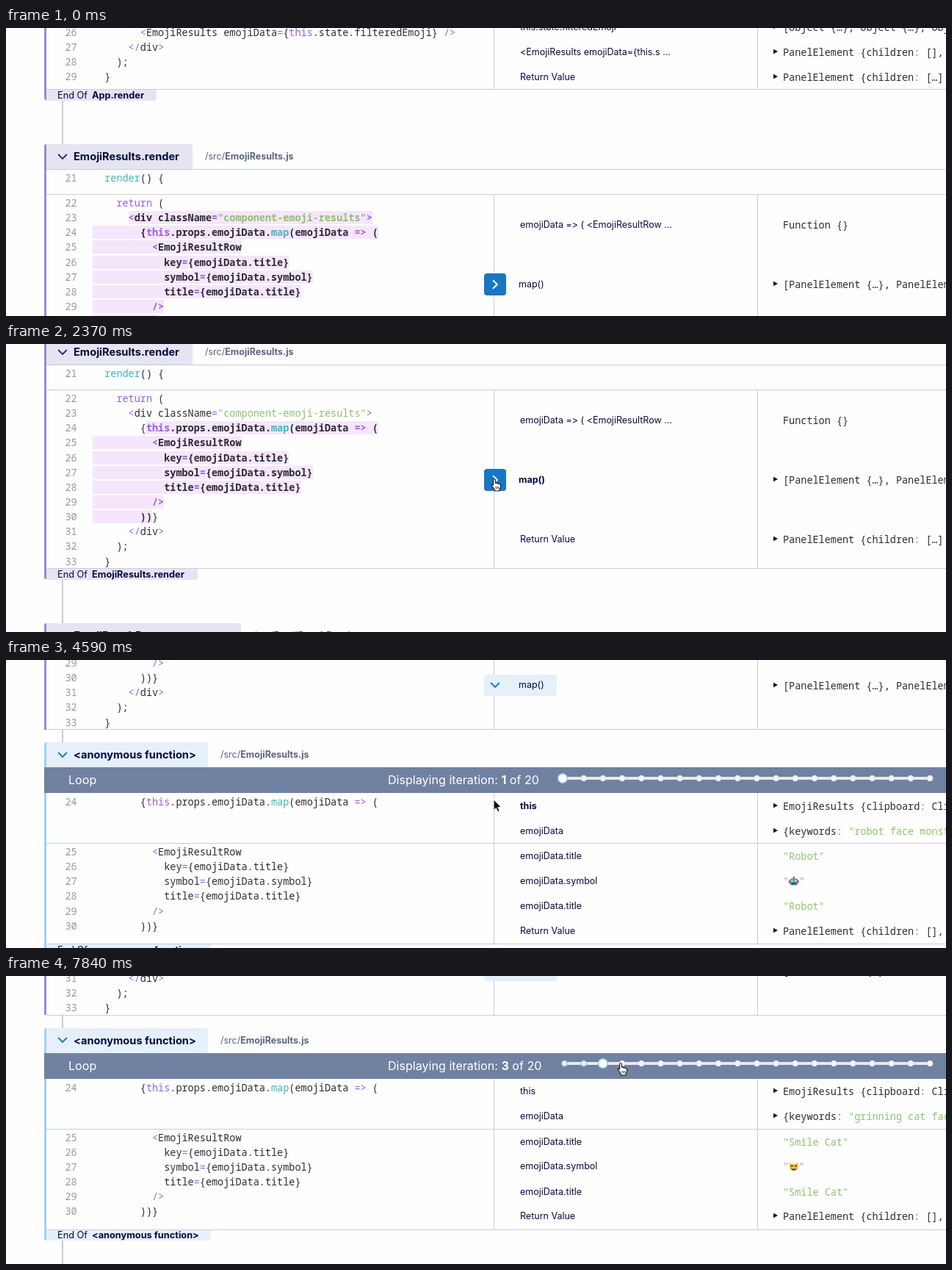
These frames come from a looping animation (1280 px wide and 392 px high, 8000 ms). An HTML page:

```html
<!DOCTYPE html>
<html lang="en">
<head>
<meta charset="utf-8">
<title>Code trace viewer</title>
<style>
  html, body { margin: 0; width: 100%; height: 100%; overflow: hidden; background: #fefefe; }
  #stage { position: relative; width: 1280px; height: 392px; overflow: hidden; }
  #page { position: absolute; left: 0; top: 0; width: 1280px; }
  #page > *, #cursor { position: absolute; }
  .t { margin-top: -10px; white-space: pre; font: 12.5px/20px Inter, sans-serif; color: #060b3f;
    font-variant-ligatures: none; font-feature-settings: "calt" 0; }
  .mono { font: 13.5px/20px "Noto Sans Mono", "DejaVu Sans Mono", monospace; color: #2c2c33; }
  .num { color: #999; }
  .title { font-size: 14.6px; font-weight: 700; }
  .path { color: #5b6180; }
  .bar { font-size: 16.1px; color: #fff; }
  .foot { font-size: 12.75px; }
  .bold { font-weight: 700; }
  .key { color: #9a5fe0; }
  .call { color: #46b3c2; }
  .str { color: #90c071; }
  mark { background: #f5e6fc; color: inherit; font-weight: 700; }
  svg { overflow: visible; }
  .emoji { width: 13.5px; height: 13.5px; vertical-align: -2px; }
</style>
</head>
<body>
<div id="stage"><div id="page"></div><svg id="cursor" width="1" height="1"></svg></div>
<script>
const LOOP = 8000, TICKS = 54, PITCH = 20.14, RULE = '#c9cce0';
const PURPLE = { edge: '#9a8bd0', tab: '#e6e4f2', icon: '#3b1d9b' };
const BLUE = { edge: '#a2d0f0', tab: '#e5f0fb', icon: '#1b79c5' };

const appCode = [
  '        <EmojiResults emojiData={this.state.filteredEmoji} />',
  '      </div>', '    );', '  }'];
const loopCode = [
  '        {this.props.emojiData.map(emojiData => (',
  '          <EmojiResultRow',
  '            key={emojiData.title}',
  '            symbol={emojiData.symbol}',
  '            title={emojiData.title}',
  '          />',
  '        ))}'];
const resultsCode = ['    return (', '      <div className="component-emoji-results">',
  ...loopCode, '      </div>', '    );', '  }'];

// Marked code per hovered row: first line, column, last line, column.
const FUNCTION_MARK = [24, 34, 30, 9], MAP_MARK = [24, 9, 30, 10], RETURN_MARK = [23, 6, 31, 12];
const PARAM_MARK = [24, 34, 24, 43];

const robot = `<svg class="emoji" viewBox="0 0 14 14"><path d="M7 1v3" stroke="#d8434e" stroke-width="2.4"/>
  <path d="M0 6h2v4H0zM12 6h2v4h-2z" fill="#d8434e"/><rect x="1.5" y="3.5" width="11" height="9.5" rx="2" fill="#668c99"/>
  <circle cx="4.6" cy="7" r="1.5" fill="#8ff0f5"/><circle cx="9.4" cy="7" r="1.5" fill="#8ff0f5"/>
  <path d="M4 10.8h6" stroke="#26343c" stroke-width="1.6"/></svg>`;
const cat = eyes => `<svg class="emoji" viewBox="0 0 14 14"><path d="M1 1l4 2.2h4L13 1v7a6 5 0 0 1-12 0z" fill="#f6bd35"/>
  <path d="${eyes}" fill="none" stroke="#4b3213" stroke-width="1.3"/>
  <path d="M3.5 8.6h7a3.5 3.4 0 0 1-7 0z" fill="#6a3a1c"/><path d="M4.2 9h5.6" stroke="#fff"/></svg>`;
const iterations = [
  { keywords: 'robot face monster', title: 'Robot', symbol: robot },
  { keywords: 'smiling cat face', title: 'Smiley Cat', symbol: cat('M4.3 4.6v2.4M9.7 4.6v2.4') },
  { keywords: 'grinning cat face', title: 'Smile Cat', symbol: cat('M3 6.6q1.3-2.4 2.6 0M8.4 6.6q1.3-2.4 2.6 0') }];

// Keys are [tick, values...], joined by straight lines.
const scrollKeys = [[4, 0], [7, 31.5], [12, 150], [14, 164], [23, 164], [27, 246.5], [31, 375], [32, 375], [36, 416.3]];
const cursorKeys = [[1, 702, 425], [5, 690, 345], [7, 688, 326], [12, 680, 215], [16, 665, 184], [19, 665, 184],
  [20, 664, 186], [27, 664, 187], [31, 664, 190], [32, 664, 190], [36, 670, 185], [40, 755, 126], [43, 786, 119],
  [46, 811, 119], [49, 811, 119], [50, 834, 119], [51, 863, 119], [52, 856, 119], [53, 837, 119]];

function at(keys, tick) {
  const next = keys.findIndex(key => key[0] > tick);
  if (next === 0) return keys[0].slice(1);
  if (next < 0) return keys.at(-1).slice(1);
  const a = keys[next - 1], b = keys[next], p = (tick - a[0]) / (b[0] - a[0]);
  return a.slice(1).map((v, i) => v + (b[i + 1] - v) * p);
}

const escape = s => s.replace(/&/g, '&amp;').replace(/</g, '&lt;').replace(/>/g, '&gt;');
const paint = s => s.replace(
  /("[^"]*"?)|(\bthis\b|\breturn\b|=>|<\/?|\/?>|=|:)|((?:render|map)(?=\())/g,
  (all, str, key) => `<span class="${str ? 'str' : key ? 'key' : 'call'}">${escape(all)}</span>`);

const text = (x, y, html, cls = '') => `<div class="t ${cls}" style="left:${x}px;top:${y}px">${html}</div>`;
const box = (x, y, w, h, color, radius = 0) =>
  `<div style="left:${x}px;top:${y}px;width:${w}px;height:${h}px;background:${color};border-radius:${radius}"></div>`;
const rule = y => box(55, y, 1225, 1, RULE);
const columns = (y0, y1) => box(664, y0, 1, y1 - y0, RULE) + box(1023, y0, 1, y1 - y0, RULE);
const connector = (y0, y1) => box(76, y0, 1.5, y1 - y0, '#c6c8dc');
const chevron = (x, y, color, angle = 0) =>
  `<svg width="1" height="1" style="left:${x}px;top:${y}px"><path d="M-5.8-3 0 2.9 5.8-3" transform="rotate(${angle})"
    fill="none" stroke="${color}" stroke-width="2"/></svg>`;

function codeBlock(first, y, lines, mark = [0, 0, 0, 0]) {
  const [l0, c0, l1, c1] = mark;
  return lines.map((src, i) => {
    const n = first + i, inside = n >= l0 && n <= l1;
    const from = inside && n === l0 ? c0 : 0, to = !inside ? 0 : n === l1 ? c1 : src.length;
    const marked = to > from ? `<mark>${paint(src.slice(from, to))}</mark>` : '';
    const html = paint(src.slice(0, from)) + marked + paint(src.slice(to));
    return text(80.5, y + i * PITCH, n, 'mono num') + text(118, y + i * PITCH, html, 'mono');
  }).join('');
}

const triangle = y =>
  `<svg width="1" height="1" style="left:1044.5px;top:${y}px"><path d="M0-3.2 6 0 0 3.2z" fill="#111"/></svg>`;
const label = (x, y, name, bold) => text(x, y, escape(name), bold ? 'bold' : '');
const value = (y, html, expandable) => (expandable ? triangle(y - 1) : '') + text(1058, y, html, 'mono');
const row = (y, name, source, bold, expandable = true) => label(700, y, name, bold) + value(y, paint(source), expandable);

const header = (y, width, title, file, theme) =>
  box(52, y, width, 34, theme.tab, '4px 4px 0 0') + chevron(76.5, y + 16.5, theme.icon) +
  text(92, y + 17, escape(title), 'title') + text(width + 69, y + 17, `/src/<b>${file}</b>`, 'path');
const footer = (y, width, title, theme) =>
  box(52, y + 1, width, 14.5, theme.tab, '0 0 4px 4px') + box(52, y, 3, 15, theme.edge, '0 0 0 4px') +
  text(70, y + 8.5, 'End Of', 'foot') + text(117, y + 8.5, escape(title), 'foot bold');
const edge = (y0, y1, theme) => box(52, y0, 3, y1 - y0, theme.edge, '4px 0 0 0');

function appSection() {
  return edge(-60, 84, PURPLE) + columns(-60, 83) + codeBlock(26, 6, appCode) +
    row(-1, 'this.state.filteredEmoji', '[Object {…}, Object {…}, Object {…}]') +
    row(33, '<EmojiResults emojiData={this.s ...', 'PanelElement {children: [], props: {…}}') +
    row(67, 'Return Value', 'PanelElement {children: […], props: {…}}') +
    rule(83) + footer(83, 153, 'App.render', PURPLE) + connector(98.5, 158);
}

function resultsSection(open, hover) {
  const marks = [FUNCTION_MARK, MAP_MARK, RETURN_MARK];
  const mapY = open ? 409 : 348.5, bold = hover === 1;
  const toggle = open
    ? box(651, mapY - 14.5, bold ? 101.5 : 98.5, 29, BLUE.tab, '4px') + chevron(665.5, mapY - .5, BLUE.icon)
    : box(650.5, mapY - 15, 30, 30, '#1976c4', '4px') + chevron(665.5, mapY, '#fff', -90);
  return header(158, 202, 'EmojiResults.render', 'EmojiResults.js', PURPLE) + edge(158, 469.5, PURPLE) +
    rule(192) + codeBlock(21, 204, ['  render() {']) + rule(226) + columns(227, 469) +
    codeBlock(22, 238, resultsCode, marks[hover]) +
    row(open ? 288.5 : 268, 'emojiData => ( <EmojiResultRow ...', 'Function {}', hover === 0, false) +
    toggle + label(698, mapY, 'map()', bold) +
    value(mapY + .5, '[PanelElement {…}, PanelElement {…}]', true) +
    (open ? '' : row(429.5, 'Return Value', 'PanelElement {children: […], props: {…}}', hover === 2)) +
    rule(469);
}

function slider(y, current) {
  const dotX = i => i === 0 && current === 0 ? 758 : 760.5 + 26.19 * i;
  let dots = '';
  for (let i = 0; i < 20; i++) {
    const big = i === current;
    dots += `<circle cx="${dotX(i)}" cy="0" r="${big ? 6.3 : 3.7}" fill="${big ? '#fff' : i < current ? '#e4f1fb' : '#f5f5f5'}"
      stroke="${i <= current ? '#96d0f3' : '#e4e4e6'}" stroke-width="${big ? 1.6 : 1.2}"/>`;
  }
  return `<svg width="1280" height="1" style="left:0;top:${y}px">
    <path d="M758 0H1258" stroke="#e9e9ea" stroke-width="4"/>${dots}</svg>`;
}

function loopSection(current, hover) {
  const { keywords, title, symbol } = iterations[current];
  return connector(469.5, 487) + header(487, 223, '<anonymous function>', 'EmojiResults.js', BLUE) +
    edge(487, 762, BLUE) + columns(556, 761) + box(52, 521.3, 1228, 35.2, '#7081a2') +
    text(85, 538, 'Loop', 'bar') +
    text(520, 538, `Displaying iteration: <b>${current + 1}</b> of 20`, 'bar') + slider(535.5, current) +
    codeBlock(24, 568, loopCode.slice(0, 1), hover === 1 ? PARAM_MARK : undefined) + rule(624) +
    codeBlock(25, 636, loopCode.slice(1)) +
    row(573.5, 'this', 'EmojiResults {clipboard: Clipboard {…}}', hover === 0) +
    row(607.5, 'emojiData', `{keywords: "${keywords}"}`, hover === 1) +
    row(642, 'emojiData.title', `"${title}"`, hover === 2, false) +
    label(700, 675.5, 'emojiData.symbol', hover === 3) +
    value(675.5, `<span class="str">"${symbol}"</span>`, false) +
    row(710, 'emojiData.title', `"${title}"`, hover === 4, false) +
    row(743.7, 'Return Value', 'PanelElement {children: [], props: {…}}', hover === 5) +
    rule(761) + footer(761, 227, '<anonymous function>', BLUE) + connector(776.5, 860);
}

const nextSection = () => footer(469, 209, 'EmojiResults.render', PURPLE) + connector(484.5, 544) +
  header(544, 268, 'EmojiResultRow.constructor', 'EmojiResultRow.js', PURPLE) + edge(544, 640, PURPLE);

const arrow = `<path d="M0 0V14.6L3.3 11.5 5.6 16.6 8.2 15.5 5.9 10.5H10.4Z" fill="#111" stroke="#fff"/>`;
const hand = `<g transform="translate(-4 -1)" stroke="#111" stroke-width="1.1"><path fill="#fff" d="M2.6 9.5V2.2a1.4 1.4 0 0 1 2.8 0V6.2
  Q7.4 5.2 8 6.9Q10 6 10.4 7.8Q12.6 7.2 12.6 9.3V11.6Q12.4 13.5 11 15.2V17H4.6Q4.4 15.2 3 13.4L.4 10Q-.4 8.2 1.2 8Q2 8.2 2.6 9.5Z"/>
  <path d="M6 11v3.4M8 11v3.4M10 11v3.4" stroke-width=".8"/></g>`;

const page = document.getElementById('page'), cursor = document.getElementById('cursor');

function render(tick) {
  const [scroll] = at(scrollKeys, tick), [x, y] = at(cursorKeys, tick);
  const pageY = y + scroll, open = tick >= 20;
  const current = tick >= 46 ? 2 : tick >= 43 ? 1 : 0;
  const resultsHover = pageY < 469 ? Math.floor((pageY - 227) / (open ? 121 : 242 / 3)) : -1;
  const loopHover = Math.floor((pageY - 556.5) / 34);
  const onMap = x >= 651 && x <= 750 && Math.abs(pageY - (open ? 409 : 348.5)) < 14.5;
  const onSlider = x > 750 && Math.abs(pageY - 535.5) < 11;

  page.innerHTML = appSection() + resultsSection(open, resultsHover) +
    (open ? loopSection(current, loopHover) : nextSection());
  page.style.top = -scroll + 'px';
  cursor.innerHTML = onMap || onSlider ? hand : arrow;
  cursor.style.left = x + 'px';
  cursor.style.top = y + 'px';
}

let shown = -1;
function play() {
  const time = performance.now() % LOOP;
  const tick = Math.min(TICKS - 1, Math.floor((time + 20) * TICKS / LOOP));
  if (tick !== shown) render(shown = tick);
  requestAnimationFrame(play);
}
play();
</script>
</body>
</html>
```
